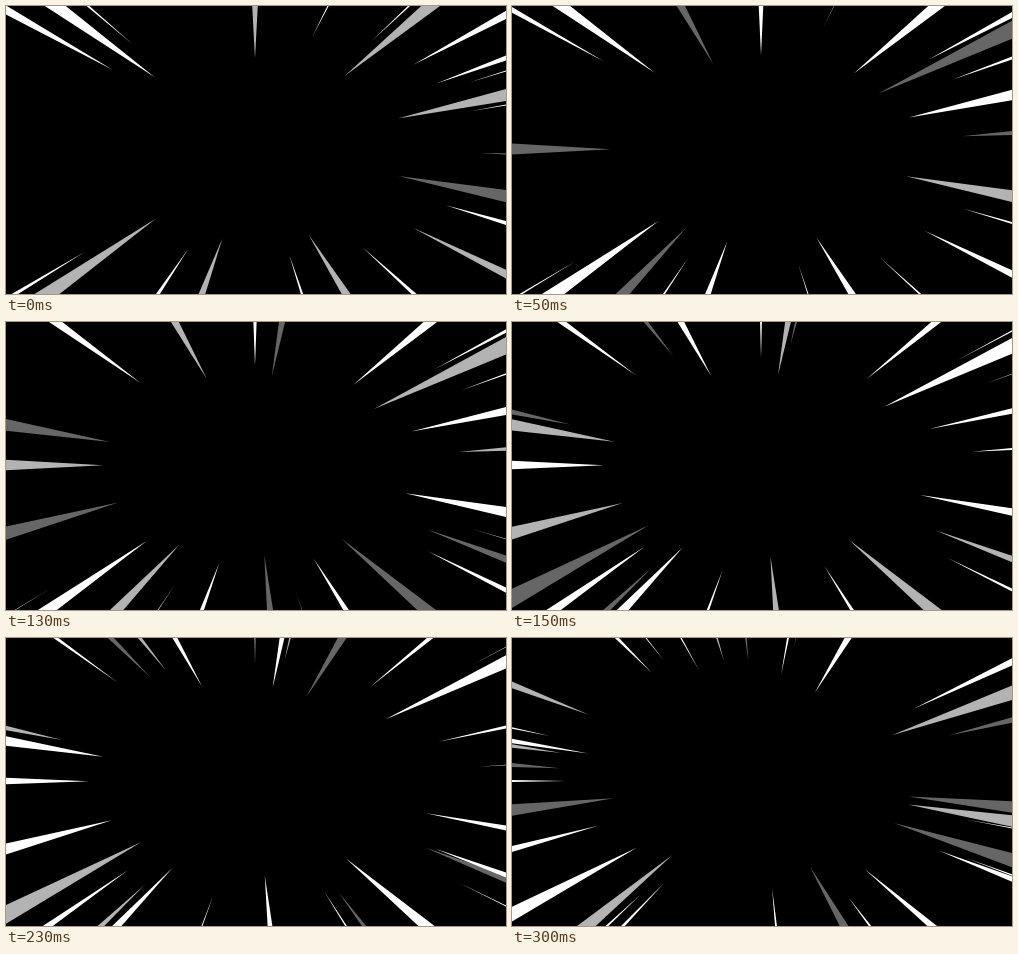
Write an HTML page that moves like this. It is 500 by 288 pixels and loops after 0.35 s.

```html
<!DOCTYPE html>
<html lang="en">
<head>
<meta charset="utf-8">
<title>Speed lines</title>
<style>
  html, body { margin: 0; width: 100%; height: 100%; overflow: hidden; background: #000; }
  svg { display: block; width: 100%; height: 100%; }
</style>
</head>
<body>
<svg id="stage" viewBox="0 0 500 288"></svg>
<script>
const W = 500, H = 288, CX = 249, CY = 143.5;
const STEP = 50, LIFE = 7, FIRST_BIRTH = -6;
const stage = document.getElementById('stage');

// Rays born at each step, by where they cross the border (px clockwise from top left).
const bold = { reach: 1, taper: .11, births: [
  [82, 403], [322, 880, 1572], [992, 1136], [], [50],
  [249, 424, 589, 948, 1092, 1246], [690], [169, 524, 1177, 1433],
  [276, 868, 1024, 1365, 1473], [1300], [336], [555, 683, 1213], [669, 722, 956, 1404]
] };
const fine = { reach: 1.35, taper: .08, births: [
  [], [], [565, 669, 1279, 1419, 1461], [599, 648], [509, 552, 717],
  [768], [], [627],
  [737], [134, 284, 1193, 1486], [105, 741, 930], [205, 1468, 1529], [234, 582, 1449]
] };

function borderPoint(p) {
  if (p < W) return [p, 0];
  if (p < W + H) return [W, p - W];
  if (p < 2 * W + H) return [2 * W + H - p, H];
  return [0, 2 * (W + H) - p];
}

function makeRay(p, birth, { reach, taper }) {
  const [x, y] = borderPoint(p);
  const edge = Math.hypot(x - CX, y - CY);
  const ux = (x - CX) / edge, uy = (y - CY) / edge;
  const radius = reach / Math.hypot(ux / 150, uy / 90);
  const node = document.createElementNS(stage.namespaceURI, 'polygon');
  node.setAttribute('fill', '#fff');
  stage.append(node);
  return { node, birth, taper, edge, ux, uy, radius };
}

const rays = [bold, fine].flatMap(kind => kind.births.flatMap(
  (places, i) => places.map(p => makeRay(p, FIRST_BIRTH + i, kind))));

// The tip rides an ellipse that opens ever faster while the ray brightens and thins.
function drawRay({ node, birth, taper, edge, ux, uy, radius }, step) {
  const age = step - birth;
  const tip = radius * (1 + .012 * age ** 2);
  const shown = age >= 0 && age < LIFE && tip < edge;
  node.setAttribute('opacity', shown ? Math.min(1, .4 + .3 * age) : 0);
  if (!shown) return;

  const thin = ((edge - tip) / (edge - radius)) ** 2;
  const far = edge + 40; // past the border, so wide rays also cover the corners
  const half = (far - tip) * taper * thin / 2;
  const at = (r, side) => [CX + ux * r - uy * side, CY + uy * r + ux * side];
  const points = [at(tip, 0), at(far, half), at(far, -half)];
  node.setAttribute('points', points.map(q => q.map(v => v.toFixed(2))).join(' '));
}

function render(ms) {
  const step = Math.floor(ms / STEP) % LIFE;
  rays.forEach(ray => drawRay(ray, step));
}

const begin = performance.now();
function tick() {
  render(performance.now() - begin);
  requestAnimationFrame(tick);
}
tick();
</script>
</body>
</html>
```
